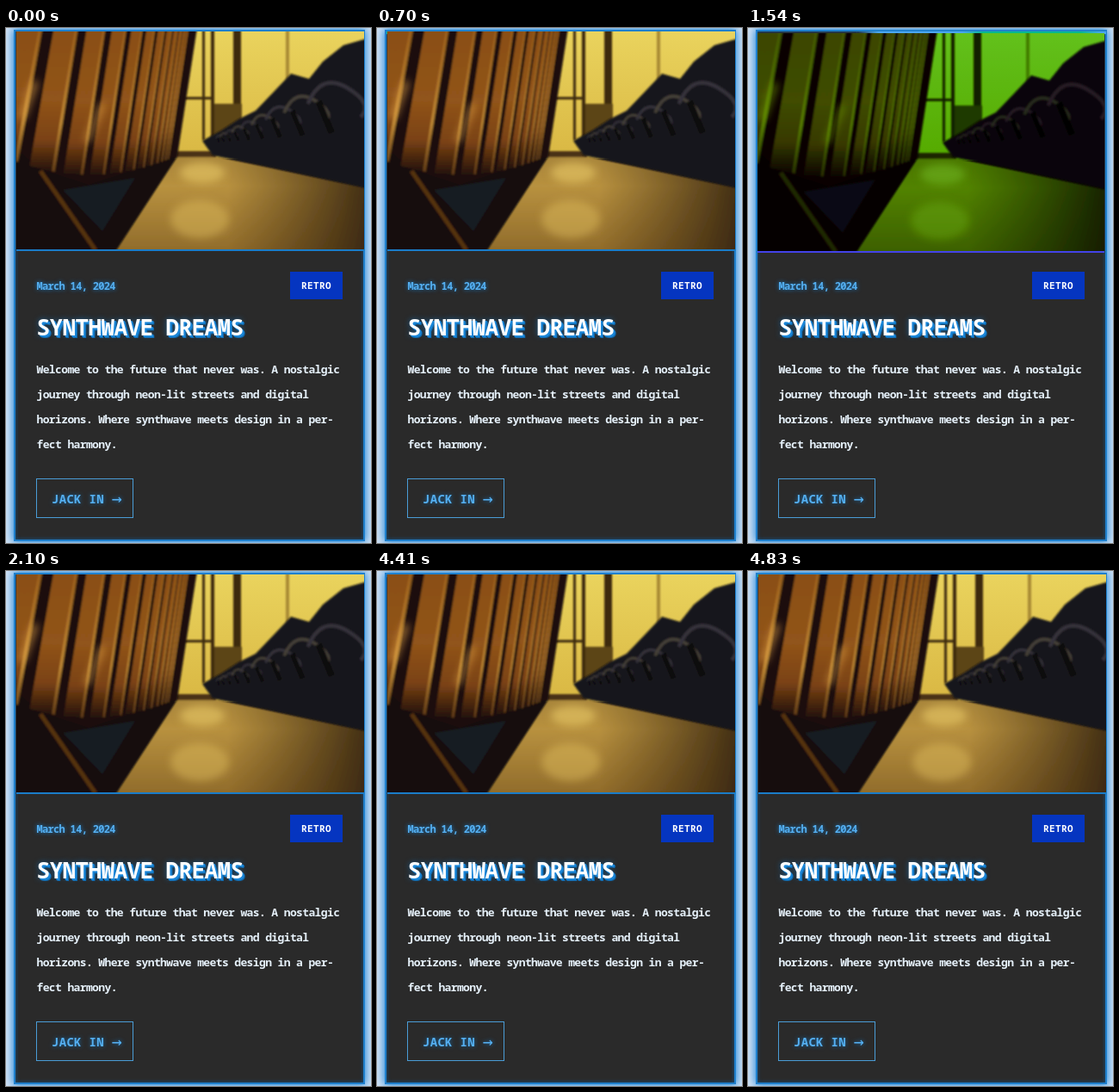
An HTML page that plays this animation: 424 by 598 pixels, repeating every 4.9 s.

```html
<!DOCTYPE html>
<html lang="en">
<head>
<meta charset="utf-8">
<title>Synthwave Dreams</title>
<style>
  :root { --blue: #1a7cc8; --sky: #55b0f2; --loop: 4900ms; }
  html, body { margin: 0; width: 100%; height: 100%; overflow: hidden; }
  body { background: #d3e2f3; font-family: "Noto Sans Mono", "DejaVu Sans Mono", monospace; }
  .stage { position: absolute; left: 0; top: 0; width: 424px; height: 598px; overflow: hidden; }
  .card {
    position: absolute; left: 9px; top: 2px; width: 404px; height: 590px;
    border: 2px solid #2080cc; background: #2a2a2a;
    box-shadow: 0 0 10px 1px #1a86dc, inset 0 0 4px #14568c;
  }
  .window { position: absolute; left: 11px; top: 4px; width: 405px; height: 264px; overflow: hidden; }
  .photo {
    position: absolute; left: 1px; top: 0; width: 404px; height: 253px;
    border-bottom: 2px solid var(--blue);
    animation: glitch var(--loop) step-end infinite;
  }
  .photo svg { display: block; }
  .track { position: absolute; left: 11px; top: 1px; width: 405px; height: 8px; overflow: hidden; }
  .bar {
    height: 3px; margin-top: 3px;
    background: linear-gradient(90deg, transparent, #4ba6ec 6%, #4ba6ec 30%, #08b98c 36%,
      #08b98c 64%, #4ba6ec 70%, #4ba6ec 94%, transparent);
    box-shadow: 0 0 3px rgba(60, 150, 225, .4);
    animation: sweep var(--loop) linear infinite;
  }
  .text { position: absolute; margin: 0; left: 35.5px; white-space: pre; }
  .date {
    top: 290px; font-size: 12px; line-height: 20px; letter-spacing: -.68px; font-weight: 600;
    color: var(--sky); text-shadow: 0 0 5px #1a7cc8;
  }
  .tag {
    position: absolute; left: 330px; top: 283px; width: 61px; height: 32px;
    background: #0535c0; color: #fff; font: bold 11px/32px "Noto Sans Mono", monospace;
    text-align: center; letter-spacing: .4px;
    animation: flicker var(--loop) step-end infinite;
  }
  h1 {
    top: 327px; font-size: 26px; line-height: 40px; letter-spacing: -.6px; font-weight: 800;
    color: #fff; text-shadow: 2px 2px 0 #1a86d8, 3px 3px 0 #0f68ac, 0 0 6px #1a5c90;
  }
  .body {
    top: 382px; font-size: 13px; line-height: 29.1px; letter-spacing: -.62px; font-weight: 600;
    color: #e6f1fa;
  }
  .button {
    position: absolute; left: 35px; top: 523px; width: 111px; height: 44px;
    border: 1px solid #4a9cd6; color: var(--sky); font-size: 14px; line-height: 45px;
    letter-spacing: .3px; font-weight: 600; text-indent: 17px; white-space: pre;
    text-shadow: 0 0 5px #1a6cac;
  }
  .arrow { font: 20px/1 "DejaVu Sans Mono", monospace; vertical-align: -1px; }
  @keyframes sweep {
    0% { transform: translateX(81.9%); }
    3.878% { transform: translateX(100%); }
    3.879% { transform: translateX(-100%); }
    46.735% { transform: translateX(100%); }
    46.736% { transform: translateX(-100%); }
    89.592% { transform: translateX(100%); }
    89.593% { transform: translateX(-100%); }
    100% { transform: translateX(-51.4%); }
  }
  @keyframes glitch {
    0%, 12.85%, 32.85%, 98.56%, 100% { transform: none; filter: none; }
    11.42%, 97.13% {
      transform: translate(-5px, 5px);
      filter: hue-rotate(90deg) brightness(.8) saturate(1.6) contrast(1.15);
    }
    31.42% {
      transform: translate(-2px, 2px);
      filter: hue-rotate(38deg) brightness(.76) saturate(1.5) contrast(1.1);
    }
  }
  @keyframes flicker {
    0%, 4.28%, 65.7%, 68.56%, 100% { background: #0535c0; color: #fff; }
    2.85%, 64.27%, 67.13% { background: #1f4476; color: #7d7f82; }
  }
</style>
</head>
<body>
<div class="stage">
  <div class="card"></div>
  <div class="track"><div class="bar"></div></div>
  <div class="window">
    <div class="photo">
      <svg width="404" height="253" viewBox="12 4 404 253">
        <defs>
          <linearGradient id="glass" x1="0" y1="0" x2="0" y2="1">
            <stop offset="0" stop-color="#ead45e"/><stop offset="1" stop-color="#d9b743"/>
          </linearGradient>
          <linearGradient id="floor" x1="0" y1="0" x2="0" y2="1">
            <stop offset="0" stop-color="#a8853a"/><stop offset=".3" stop-color="#b8913f"/>
            <stop offset="1" stop-color="#8f6a2a"/>
          </linearGradient>
          <linearGradient id="shade" x1="0" y1="0" x2="1" y2="0">
            <stop offset=".45" stop-color="#3a260c" stop-opacity="0"/>
            <stop offset="1" stop-color="#2c1c0c" stop-opacity=".85"/>
          </linearGradient>
          <linearGradient id="slat" x1="0" y1="0" x2="0" y2="1">
            <stop offset="0" stop-color="#8a4f18"/><stop offset=".5" stop-color="#91541a"/>
            <stop offset=".78" stop-color="#7a4214"/><stop offset="1" stop-color="#24120a"/>
          </linearGradient>
          <linearGradient id="edge" gradientUnits="userSpaceOnUse" x1="0" y1="0" x2="0" y2="185">
            <stop offset="0" stop-color="#a8691f"/><stop offset=".6" stop-color="#dca240"/>
            <stop offset="1" stop-color="#5a3010"/>
          </linearGradient>
          <filter id="soft" x="-5%" y="-5%" width="110%" height="110%">
            <feGaussianBlur stdDeviation="1.1"/>
          </filter>
          <filter id="haze" x="-60%" y="-60%" width="220%" height="220%">
            <feGaussianBlur stdDeviation="5"/>
          </filter>
        </defs>
        <rect x="0" y="0" width="430" height="270" fill="#150f0d"/>
        <rect x="190" y="0" width="230" height="152" fill="url(#glass)"/>
        <g filter="url(#soft)">
          <path d="M228 0h3v130h-3zM238 0h4v140h-4zM264 0h9v110h-9zM205 80h35v3h-35z" fill="#3d2c0f"/>
          <path d="M242 88H274V130H242z" fill="#5b4417"/>
          <path d="M325 0h4v60h-4z" fill="#a88a35"/>
          <path d="M197 150H250L420 186V262H124z" fill="url(#floor)"/>
          <path d="M197 150H250L420 186V262H124z" fill="url(#shade)"/>
          <path d="M196 143H244V150H194z" fill="#4a3312"/>
        </g>
        <g fill="#e2c060" filter="url(#haze)">
          <ellipse cx="228" cy="168" rx="26" ry="12" opacity=".7"/>
          <ellipse cx="225" cy="222" rx="34" ry="22" opacity=".45"/>
        </g>
        <g filter="url(#soft)">
          <path d="M0 0H222L199 149L122 262H0z" fill="#1c0f0a"/>
          <path d="M199 149L128 258H108L40 164L96 182z" fill="#120e0e"/>
          <path d="M0 130L40 164L104 260H0z" fill="#160e0b"/>
          <g id="slats"></g>
          <path d="M40 166L104 258" stroke="#55300f" stroke-width="5"/>
          <path d="M66 188L150 174L112 236z" fill="#161a22"/>
        </g>
        <g stroke="#e8a84a" stroke-width="7" filter="url(#haze)">
          <path d="M18 105L34 62" opacity=".7"/>
          <path d="M94 132L112 88" opacity=".6"/>
        </g>
        <g filter="url(#soft)">
          <path d="M228 131L250 119L270 106L290 96L313 72L331 53L352 59L368 39L392 20L420 12V186L300 160L240 148z" fill="#18161a"/>
          <g id="seats" fill="none"></g>
        </g>
      </svg>
    </div>
  </div>
  <div class="text date">March 14, 2024</div>
  <div class="tag">RETRO</div>
  <h1 class="text">SYNTHWAVE DREAMS</h1>
  <p class="text body">Welcome to the future that never was. A nostalgic
journey through neon-lit streets and digital
horizons. Where synthwave meets design in a per-
fect harmony.</p>
  <div class="button">JACK IN <span class="arrow">→</span></div>
</div>
<script>
  const add = (id, attrs) => {
    const el = document.createElementNS("http://www.w3.org/2000/svg", "path");
    for (const key in attrs) el.setAttribute(key, attrs[key]);
    document.getElementById(id).append(el);
  };

  // Wooden slats receding towards the end of the hall.
  const head = p => `${222 - 160 * p} 0`;
  const foot = p => `${199 - 165 * p} ${148 + 72 * p - 58 * p * p}`;
  for (let i = 0; i < 12; i++) {
    const p = 1.35 * 0.77 ** i;
    const q = p * 0.84;
    add("slats", { d: `M${head(p)}L${head(q)}L${foot(q)}L${foot(p)}z`, fill: "url(#slat)" });
    add("slats", {
      d: `M${head(q)}L${foot(q)}`, stroke: "url(#edge)", "stroke-width": 1 + 2.5 * p, opacity: 0.75
    });
  }

  // Rounded seat backs growing towards the viewer.
  for (let i = 0; i < 9; i++) {
    const r = 4 * 1.29 ** i;
    const x = 228 + r * 5;
    const y = 134 - r * 2.5;
    add("seats", {
      d: `M${x - r} ${y + r}Q${x - r * 0.5} ${y - r * 0.2} ${x + r * 0.5} ${y + r * 0.4}T${x + r} ${y + r * 1.5}`,
      stroke: i % 2 ? "#453f38" : "#35333a", "stroke-width": 1 + r / 9
    });
    add("seats", {
      d: `M${x - r * 0.6} ${y + r * 0.9}l${r * 0.5} ${r * 1.2}`,
      stroke: "#0b090a", "stroke-width": 1 + r / 5
    });
  }
</script>
</body>
</html>
```
